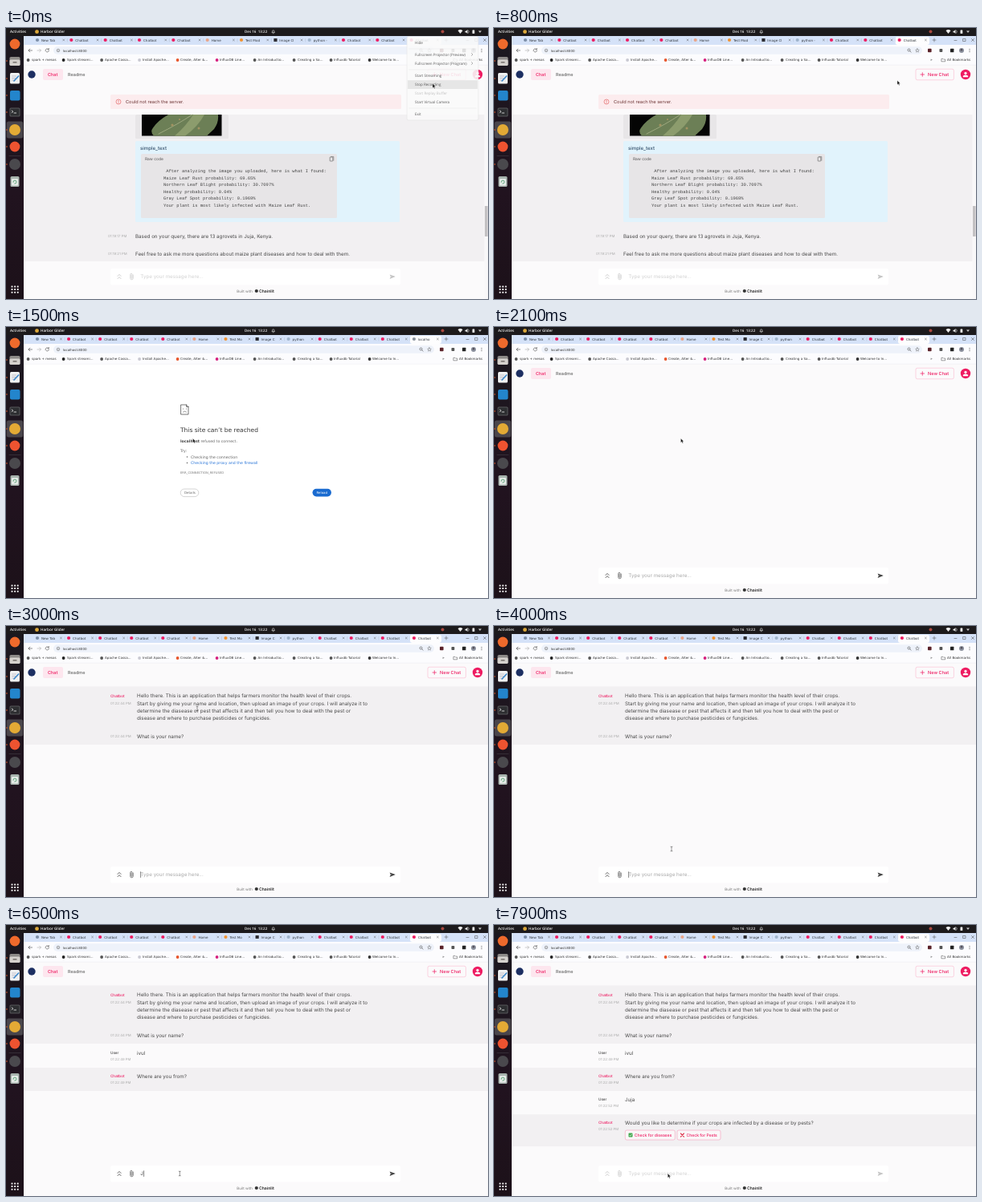
Write an HTML page that moves like this. It is 600 px wide and 338 px high and loops after 8000 ms.

```html
<!DOCTYPE html>
<html lang="en">
<head>
<meta charset="utf-8">
<title>Crop chatbot session</title>
<style>
html, body { margin: 0; width: 100%; height: 100%; overflow: hidden; background: #fafafa; }
svg { display: block; width: 100vw; height: 100vh; text-rendering: geometricPrecision; }
text { white-space: pre; }
.ui { font-family: "DejaVu Sans", sans-serif; }
.app { font-family: Inter, sans-serif; }
.shell { font-family: "Open Sans", sans-serif; }
.mono { font-family: "Liberation Mono", monospace; }
</style>
</head>
<body>
<svg id="stage" viewBox="0 0 600 338" xmlns="http://www.w3.org/2000/svg"></svg>
<script>
const LOOP = 8000, STEP = 100;
const PINK = '#ee1c62', INK = '#484848', PAGE = '#fbfafb', BAND = '#f2f0f2', BODY = 6.25;

// Markup helpers
const text = (x, y, s, size, fill = INK, cls = 'app', more = '') =>
  `<text x="${x}" y="${y}" font-size="${size}" fill="${fill}" class="${cls}" ${more}>${s.replace(/&/g, '&amp;')}</text>`;
const rect = (x, y, w, h, fill, r = 0, more = '') =>
  `<rect x="${x}" y="${y}" width="${w}" height="${h}" rx="${r}" fill="${fill}" ${more}/>`;
const dot = (x, y, r, fill, more = '') => `<circle cx="${x}" cy="${y}" r="${r}" fill="${fill}" ${more}/>`;
const line = (d, stroke, w = .6, more = '') =>
  `<path d="${d}" fill="none" stroke="${stroke}" stroke-width="${w}" stroke-linecap="round" stroke-linejoin="round" ${more}/>`;
const shape = (d, fill, more = '') => `<path d="${d}" fill="${fill}" ${more}/>`;
const group = (id, ...parts) => `<g id="${id}">${parts.join('')}</g>`;
const bold = 'font-weight="600"', medium = 'font-weight="500"';

// Desktop: top bar and dock
function desktop() {
  const grid = [0, 1, 2].flatMap(i => [0, 1, 2].map(j => rect(6.5 + i * 3.6, 321.5 + j * 3.6, 2, 2, '#f2f2f2', .6)));
  return [
    '<linearGradient id="dock" x2="0" y2="1"><stop stop-color="#1b181f"/><stop offset=".6" stop-color="#21131f"/><stop offset="1" stop-color="#1c1119"/></linearGradient>',
    rect(0, 0, 600, 10, '#1c1a1c'),
    rect(0, 10, 22, 328, 'url(#dock)'),
    text(5, 6.4, 'Activities', 4.6, '#eee', 'shell', bold),
    dot(38.5, 4.7, 2.4, '#dca83a'),
    text(43, 6.4, 'Harbor Glider', 4.6, '#eee', 'shell', bold),
    text(297, 6.4, 'Des 16  13:22', 4.5, '#eee', 'shell', bold),
    line('M331 5.6h3.4M331.5 5.4v-1.4a1.2 1.2 0 0 1 2.4 0v1.4M332.2 6.7h1', '#ddd'),
    dot(543.5, 4.4, 2, '#a8483f'),
    shape('M562.5 3.2q3-2.4 6 0l-3 3.8z', '#eee'),
    shape('M571.5 3.7h1.3l1.7-1.6v5l-1.7-1.6h-1.3z', '#eee'), line('M575.7 3q1.3 1.5 0 3.2', '#eee'),
    rect(580.5, 2.4, 2.8, 4.6, '#eee', .5), shape('M588 3.6h4l-2 2.4z', '#ccc'),
    // dock
    dot(11, 20, 6.4, '#ee6a2c'),
    rect(4.5, 36, 13, 11, '#8d8a88', 1.6), rect(4.5, 39.5, 13, 7.5, '#d5d1cd', 1.4), rect(8.5, 42, 5, 1.4, '#77716d', .5),
    rect(5, 56, 12, 13.5, '#f0f1f2', 1.6), line('M7.5 60h5M7.5 62.5h4M7.5 65h3', '#aab', .7), line('M10 66l5.6-6', '#3d87c9', 1.7),
    rect(5, 78, 12.5, 12.5, '#2385cc', 2),
    rect(4.5, 99.5, 13, 11, '#56575a', 1.6), rect(5.5, 100.5, 11, 9, '#2d2e31', 1), line('M7.2 103l1.7 1.3-1.7 1.3M10 106h2.6', '#eee', .8),
    rect(.8, 116.5, 20.4, 21, '#4a464c', 2.5), dot(11, 127, 7, '#e3aa35'),
    dot(11, 148, 6.4, '#ee5330'),
    line('M4 159.5h14', '#4a464c', .5),
    dot(11, 170, 7, '#4a494d'),
    rect(5.5, 185, 11, 13, '#a8b3ae', 1.6), rect(7, 188, 8, 8.5, '#e6ebe8', 1), line('M9 192.3a2 2 0 1 1 1.8 1.8', '#4f9b6d', .9),
    ...[41, 63, 84, 105, 127, 148, 170].map(y => dot(1, y, .8, '#e0592a')),
    ...grid
  ].join('');
}

// Browser chrome
const TABS = [['New Tab', '#7d8fa8'], ['Chatbot', PINK], ['Chatbot', PINK], ['Chatbot', PINK], ['Chatbot', PINK],
  ['Home', '#e9a58a'], ['Test Mod', '#f19333'], ['Image Cl', '#2d2d33'], ['python -', '#9fb4cb'],
  ['Chatbot', PINK], ['Chatbot', PINK], ['Chatbot', PINK]];

function tabStrip(id, tabs, letters) {
  const pitch = 508 / tabs.length;
  return group(id, ...tabs.map(([title, color], i) => {
    const x = 34 + pitch * i, last = i === tabs.length - 1;
    return (last ? rect(x, 11, pitch, 10, '#fdfdfe', 2.4) : line(`M${x + pitch} 13.5v3.5`, '#9fb0c8', .35)) +
      `<g ${last ? `id="${id}Active"` : ''}>` +
      (i === 7 ? rect(x + 3, 12.9, 4.2, 4.2, color, .5) : dot(x + 5, 15, 2.1, color)) +
      text(x + 10, 16.5, title.slice(0, letters), 4.1, '#33383f', 'ui') + '</g>' +
      line(`M${x + pitch - 5.6} 14l2 2m0-2l-2 2`, '#555', .45);
  }));
}

const BOOKMARKS = [[27, 32, 'spark + mesos', '#555'], [71, 76, 'Spark streami...', '#222'], [118.5, 123, 'Apache Cassa...', '#555'],
  [165.5, 170, 'Install Apache...', '#c9c9d2'], [213, 217, 'Create, Alter &...', '#e8562c'], [262, 266, 'InfluxDB Line...', '#d6217f'],
  [309, 313.5, 'An Introductio...', '#555'], [358, 363, 'Creating a Sa...', '#555'], [404, 408, 'Influxdb Tutorial', '#555'],
  [452, 456, 'Welcome to In...', '#333']];

function browser() {
  return [
    rect(22, 10, 578, 12, '#d5e2f8'),
    tabStrip('tabsA', TABS, 8),
    tabStrip('tabsB', [...TABS, ['Chatbot', PINK]], 7),
    line('M546 15h4M548 13v4', '#444', .5),
    line('M573 15.5h3M584 13.5h3v3h-3zM594.5 13.5l3 3m0-3l-3 3', '#444', .5),
    rect(22, 21, 578, 25, '#fcfcfe'),
    rect(59, 23.3, 474, 9.4, '#eef2fa', 4.7),
    line('M32.5 28h-4.5m1.9-1.9l-1.9 1.9 1.9 1.9', '#444', .6),
    line('M39 28h4.5m-1.9-1.9l1.9 1.9-1.9 1.9', '#aaa', .6),
    line('M53 26.6a2.1 2.1 0 1 0 .4 1.8M53.3 25.5v1.5h-1.5', '#444', .6),
    dot(65, 28, 1.8, 'none', 'stroke="#555" stroke-width=".5"'), line('M65 27.8v1', '#555', .5),
    `<text id="url" x="71" y="29.6" font-size="4" fill="#333" class="ui"></text>`,
    dot(516.5, 27.5, 1.5, 'none', 'stroke="#444" stroke-width=".6"'), line('M517.7 28.7l1.4 1.4', '#444'),
    line('M527 25.7l.7 1.5 1.6.2-1.2 1.1.3 1.6-1.4-.8-1.4.8.3-1.6-1.2-1.1 1.6-.2z', '#444', .4),
    rect(540, 25.7, 4.6, 4.6, '#5a2229', .8), rect(554.5, 26, 3.8, 4, '#555', .8),
    rect(568, 25.8, 4.4, 4.4, '#222', .5), dot(582, 28, 3, '#8a8f9c'), dot(582, 27.2, 1.2, '#55515a'),
    ...[26.3, 28, 29.7].map(y => dot(592, y, .5, '#444')),
    ...BOOKMARKS.map(([ix, x, s, color]) => dot(ix + .6, 40, 1.9, color) + text(x, 41.4, s, 4.1, '#333', 'ui')),
    text(543, 41.4, '»', 4.5, '#333', 'ui'),
    line('M557.3 38.4h1.5l.7.7h2.2v2.7h-4.4z', '#444', .5),
    text(564, 41.4, 'All Bookmarks', 4.1, '#333', 'ui'),
    line('M22 46.2h578', '#e4e5ea', .4)
  ].join('');
}

// Application
const header = () => group('header',
  dot(32, 58, 4.7, '#1d2f62'),
  rect(46, 51, 25, 14, '#fde6ee', 2), text(52, 60, 'Chat', 5.5, PINK, 'app', medium),
  text(77, 60, 'Readme', 5.5, '#666', 'app', medium),
  rect(525, 51.2, 47.4, 13.6, 'none', 2, 'stroke="#f8a9c3" stroke-width=".5"'),
  line('M531 58h4.6M533.3 55.7v4.6', PINK, .7), text(540, 60, 'New Chat', 5.6, PINK, 'app', medium),
  dot(587, 58, 6.2, PINK), dot(587, 56.3, 1.6, '#fff'), shape('M583.7 61.3q0-2.7 3.3-2.7t3.3 2.7z', '#fff'));

const inputBar = () => group('inputBar',
  rect(130, 300, 361, 20.5, '#fff', 2.5),
  line('M139 309.4l2-2 2 2M139 312.6l2-2 2 2', 'currentColor', .8),
  line('M158.3 308v4a1.8 1.8 0 0 1-3.6 0v-4.5a1.2 1.2 0 0 1 2.4 0v4.2a.6.6 0 0 1-1.2 0v-3.7', 'currentColor', .6),
  shape('M477.6 307.4l7.2 2.6-7.2 2.9 1.2-2.6 3-.3-3.2-.3z', 'currentColor'),
  `<text id="entry" x="167.3" y="312.2" font-size="${BODY}" class="app"></text>`,
  `<path id="caret" d="M0 306.3v7.6" stroke="#333" stroke-width=".6"/>`,
  text(287.3, 330, 'Built with', 4.5, '#777'), dot(311.8, 328, 2.1, '#333'),
  text(315, 330, 'Chainlit', 5.1, '#222', 'app', bold));

const REPORT = [' After analyzing the image you uploaded, here is what I found:', 'Maize Leaf Rust probability: 69.65%',
  'Northern Leaf Blight probability: 30.7097%', 'Healthy probability: 0.04%', 'Gray Leaf Spot probability: 0.1969%',
  'Your plant is most likely infected with Maize Leaf Rust.'];

const oldChat = () => group('oldChat',
  rect(22, 108, 578, 183, BAND),
  rect(130, 83, 362, 18, '#fcecee', 1.5),
  dot(140, 92, 3, 'none', 'stroke="#e05252" stroke-width=".6"'), line('M140 90.4v1.9M140 93.6v.1', '#e05252', .6),
  text(149, 94, 'Could not reach the server.', 5.65, '#6c3434'),
  rect(161, 108, 116, 30, '#e8e6e8', 1.5), rect(169, 108, 99.5, 26.5, '#050505'),
  shape('M184 134.5q-5-5-1-10 6-9 19-16.5h62q1 10-5 18l-9 8.5z', '#6c7f56'),
  shape('M210 134.5q14-12 23-26.5h14q-8 15-24 26.5z', '#8c9c6d'),
  line('M190 132q24-12 42-24', '#aab38a', .8),
  dot(207, 121, 1.6, '#a39362'), dot(240, 125, 1.5, '#a39362'), dot(216, 114, 1.1, '#a39362'),
  rect(161, 141, 329, 101, '#e1f3fc', 1.5),
  text(167, 152.2, 'simple_text', 6.1, '#34506b', 'app', medium),
  rect(168, 157, 244, 80, '#e7e5e7', 1.5),
  text(173, 165.4, 'Raw code', 4.9, '#555'),
  rect(403.2, 161, 3.6, 5, 'none', .4, 'stroke="#555" stroke-width=".6"'), line('M404.6 160.4h3.2v4.8', '#555', .5),
  ...REPORT.map((s, i) => text(196, 180.4 + i * 8.45, s, 5.46, '#444', 'mono', 'xml:space="preserve"')),
  text(127, 261, '01:19:17 PM', 4.3, '#aaa'),
  text(161, 261.8, 'Based on your query, there are 13 agrovets in Juja, Kenya.', BODY),
  text(127, 283, '01:19:21 PM', 4.3, '#aaa'),
  text(161, 283.7, 'Feel free to ask me more questions about maize plant diseases and how to deal with them.', BODY),
  rect(595.5, 46, 4.5, 292, '#f9f8f9'), rect(596, 222, 3.6, 38, '#c3c1c3'));

function message(id, top, height, who, time, words) {
  const bot = who === 'Chatbot';
  return group(id, bot ? rect(22, top, 578, height, BAND) : '',
    text(130, top + 12.2, who, 4.6, bot ? PINK : '#444', 'app', medium),
    text(130, top + 20, time, 4.3, '#aaa'),
    text(163, top + 13, words, BODY));
}

const INTRO = ['Hello there. This is an application that helps farmers monitor the health level of their crops.',
  'Start by giving me your name and location, then upload an image of your crops. I will analyze it to',
  'determine the diasease or pest that affects it and then tell you how to deal with the pest or',
  'disease and where to purchase pesticides or fungicides.'];

const choice = (x, w, label) => rect(x, 256, w, 12, '#faf7f8', 2, 'stroke="#f58aae" stroke-width=".5"') +
  text(x + 11.5, 263.9, label, 5.07, PINK, 'app', medium);

const newChat = () => [
  group('intro', rect(22, 75.5, 578, 72.5, BAND),
    text(130, 89, 'Chatbot', 4.6, PINK, 'app', medium), text(130, 98.2, '01:22:44 PM', 4.3, '#aaa'),
    ...INTRO.map((s, i) => text(163, 89.3 + i * 9.35, s, BODY)),
    text(130, 139, '01:22:44 PM', 4.3, '#aaa'), text(163, 139.6, 'What is your name?', BODY)),
  message('reply1', 148.6, 29.5, 'User', '01:22:49 PM', 'ivul'),
  message('ask2', 178, 29, 'Chatbot', '01:22:49 PM', 'Where are you from?'),
  message('reply2', 207.2, 29, 'User', '01:22:52 PM', 'Juja'),
  message('ask3', 236.2, 40, 'Chatbot', '01:22:52 PM', 'Would you like to determine if your crops are infected by a disease or by pests?')
    .replace(/<\/g>$/, choice(163.3, 62, 'Check for diseases') + choice(228, 54, 'Check for Pests') +
      rect(167.5, 259.6, 5, 5, '#3fa64b', .8) + line('M168.7 262.2l1 1 1.8-2.2', '#fff', .7) +
      line('M232.4 260l4 4.2m0-4.2l-4 4.2', '#dc2b44', 1.1) + '</g>')
].join('');

const errorPage = () => group('errorPage',
  line('M218 97h6.5l2.5 2.5v9.5h-9zM224.5 97v2.5h2.5', '#555', .8),
  dot(220.5, 102, .5, '#555'), dot(224.5, 102, .5, '#555'), line('M220.5 106q2-2 4 0', '#555', .6),
  text(217, 131.2, 'This site can’t be reached', 7.5, '#333', 'ui'),
  text(217, 143.7, '<tspan font-weight="700" fill="#444">localhost</tspan> refused to connect.', 4.69, '#666', 'ui'),
  text(217, 156, 'Try:', 4.69, '#666', 'ui'),
  dot(225.5, 162, .8, '#666'), text(230, 163.7, 'Checking the connection', 4.69, '#666', 'ui'),
  dot(225.5, 169.5, .8, '#666'), text(230, 171.2, 'Checking the proxy and the firewall', 4.69, '#2b76d8', 'ui'),
  text(217, 183, 'ERR_CONNECTION_REFUSED', 3.75, '#777', 'ui'),
  rect(217.2, 202, 22.6, 9.6, '#fff', 4.8, 'stroke="#aaa" stroke-width=".5"'), text(222, 208.2, 'Details', 4, '#666', 'ui'),
  rect(381.5, 201.8, 23.5, 9.6, '#1a6bd0', 4.8), text(386.5, 208, 'Reload', 4, '#fff', 'ui'));

const MENU = [['Hide', 20], ['Fullscreen Projector (Preview)', 35], ['Fullscreen Projector (Program)', 46], ['Start Streaming', 61],
  ['Stop Recording', 72], ['Start Replay Buffer', 83], ['Start Virtual Camera', 94], ['Exit', 109]];

const trayMenu = () => group('trayMenu',
  rect(499, 10.5, 89, 104.5, '#fafafa', 2, 'stroke="#ddd" stroke-width=".5"'),
  rect(500, 65.2, 87, 10.8, '#e4e4e4'),
  ...[26, 52, 100].map(y => line(`M502 ${y}h83`, '#ddd', .4)),
  line('M579.5 31.5l1.5 1.5-1.5 1.5M579.5 42.5l1.5 1.5-1.5 1.5', '#555', .5),
  ...MENU.map(([s, y]) => text(509, y, s, 4.6, y === 83 ? '#bbb' : '#444', 'shell')));

const pointer = () => group('arrow', shape('M0 0v5.2l1.2-1.1.9 2 .9-.4-.9-1.9h1.6z', '#111', 'stroke="#fff" stroke-width=".3"')) +
  group('beam', line('M-1-2.8h.7l.3.4.3-.4h.7M0-2.4v4.8M-1 2.8h.7l.3-.4.3.4h.7', '#333', .5));

const stage = document.getElementById('stage');
stage.innerHTML = rect(22, 46, 578, 292, PAGE) + group('blank', rect(22, 46, 578, 292, '#fff')) +
  oldChat() + newChat() + header() + inputBar() + errorPage() + browser() + trayMenu() + desktop() + pointer();
const el = Object.fromEntries([...stage.querySelectorAll('[id]')].map(n => [n.id, n]));
const show = (id, on) => el[id].setAttribute('display', on ? 'inline' : 'none');

// Timeline: [ms, x, y] pointer stops and [ms, value] steps
const PATH = [[0, 531, 69.5], [300, 531, 69.5], [700, 502, 65.5], [800, 502, 65.5], [900, 546, 15], [1000, 546, 15], [1500, 232.5, 139],
  [2300, 232.5, 139], [2400, 238, 120], [2700, 369, 110], [3000, 238, 103], [3400, 308, 97], [3600, 248, 134],
  [3700, 248, 134], [4000, 221, 278], [4200, 219, 290], [4300, 216.3, 310], [8000, 216.3, 310]];
const TYPED = [[0, ''], [4800, 'i'], [5000, 'iv'], [5300, 'ivu'], [5400, 'ivul'], [5700, ''],
  [6500, 'J'], [6600, 'Ju'], [6800, 'Juj'], [7000, 'Juja'], [7400, '']];
const URLS = [[0, 'localhost:8000'], [900, ''], [1100, 'localhost'], [1200, 'localhost:8000']];
const ACTIVE_TAB = [[900, 'New Tab'], [1300, 'localho'], [2000, 'Chatbot']];

const at = (steps, t) => steps.reduce((value, [ms, next]) => t >= ms ? next : value, steps[0][1]);

function pointerAt(t) {
  const i = Math.max(1, PATH.findIndex(p => p[0] >= t));
  const [t0, x0, y0] = PATH[i - 1], [t1, x1, y1] = PATH[i];
  const k = (t - t0) / (t1 - t0), e = k * k * (3 - 2 * k);
  return [x0 + (x1 - x0) * e, y0 + (y1 - y0) * e];
}

function render(t) {
  const old = t < 900, loaded = t >= 2000;
  show('tabsA', old);
  show('tabsB', !old);
  show('blank', !old && !loaded);
  show('oldChat', old);
  show('header', old || loaded);
  show('inputBar', old || loaded);
  show('errorPage', t >= 1300 && t < 1800);
  Object.entries({ intro: 2200, reply1: 5700, ask2: 5900, reply2: 7400, ask3: 7500 })
    .forEach(([id, ms]) => show(id, t >= ms));

  show('trayMenu', t < 200);
  el.trayMenu.setAttribute('opacity', t < 100 ? .88 : .3);

  const title = at(ACTIVE_TAB, t);
  el.tabsBActive.querySelector('text').textContent = title;
  el.tabsBActive.querySelector('circle').setAttribute('fill', title === 'Chatbot' ? PINK : '#8a929c');
  el.url.textContent = at(URLS, t);

  const disabled = old || t >= 7400, typed = at(TYPED, t);
  el.inputBar.setAttribute('color', disabled ? '#c2c2c2' : '#3c3c3c');
  el.entry.textContent = typed || 'Type your message here...';
  el.entry.setAttribute('fill', typed ? '#444' : disabled ? '#d2d2d2' : '#a9a9a9');
  const blinkOn = t >= 4600 || Math.floor((t - 2200) / 400) % 2 === 0;
  show('caret', !disabled && t >= 2200 && blinkOn);
  const caretX = 167.6 + (typed ? el.entry.getComputedTextLength() + .4 : 0);
  el.caret.setAttribute('transform', `translate(${caretX} 0)`);

  const [x, y] = pointerAt(t), beam = t >= 2400 && t < 7400;
  show('beam', beam);
  show('arrow', !beam);
  el[beam ? 'beam' : 'arrow'].setAttribute('transform', `translate(${x} ${y})`);
}

const start = performance.now();
function frame() {
  const t = (performance.now() - start) % LOOP;
  render(Math.floor(t / STEP) * STEP);
  requestAnimationFrame(frame);
}
frame();
</script>
</body>
</html>
```
